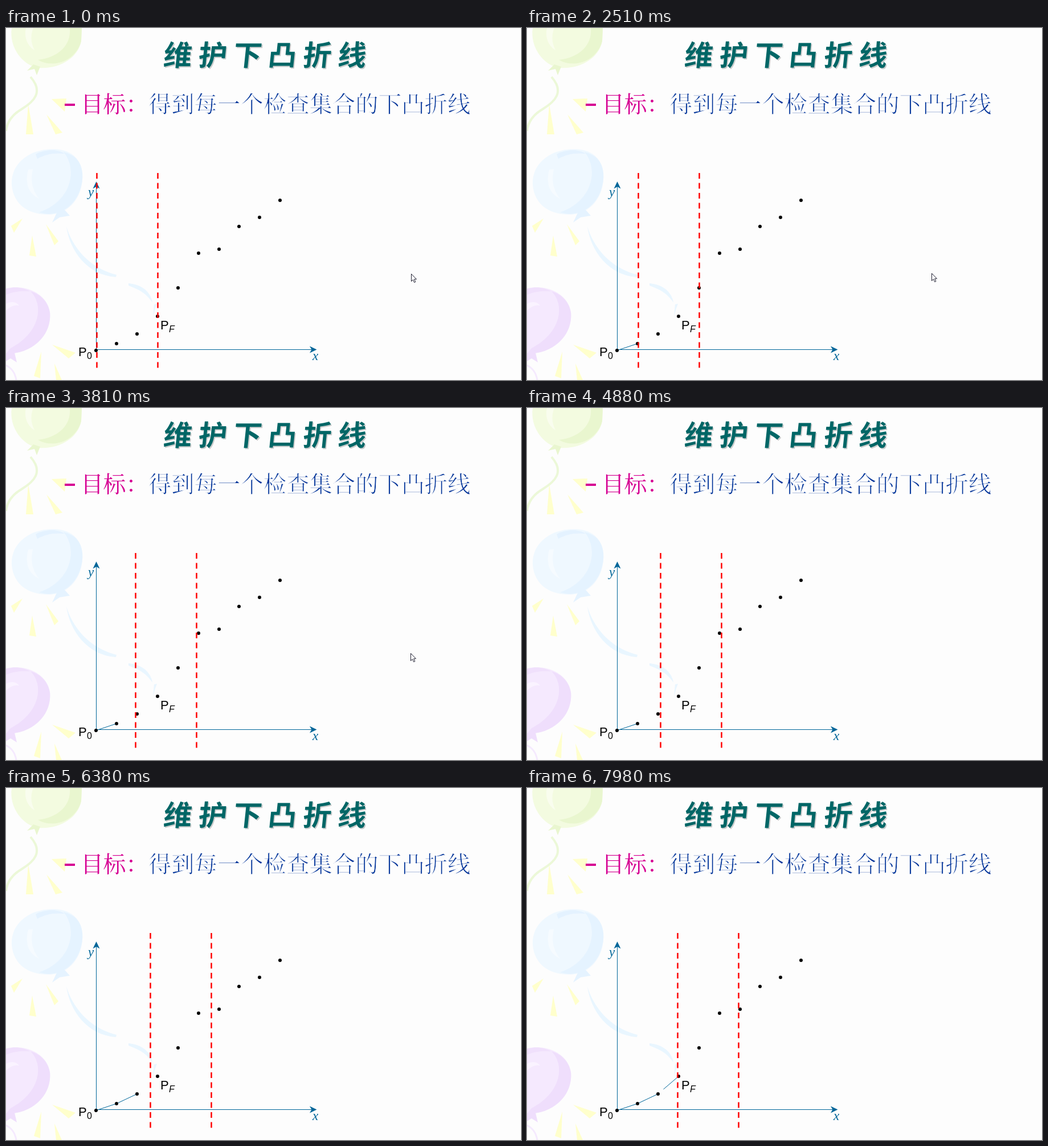
Recreate the animation shown at these times as an HTML page. Size 904x619 px, loop 8 s.

```html
<!DOCTYPE html>
<html lang="zh">
<head>
<meta charset="utf-8">
<style>
html, body { margin: 0; width: 100%; height: 100%; overflow: hidden; background: #fdfdfd; }
svg { display: block; width: 904px; height: 619px; }
.title { font: 900 50px "Noto Sans CJK SC", "Noto Sans CJK", sans-serif; letter-spacing: 11.2px; }
.goal { font: 300 40px "Noto Serif CJK SC", "Noto Sans CJK SC", "Noto Sans CJK", serif; }
.fine { stroke: #fdfdfd; stroke-width: .8; }
.label { font-family: "Liberation Sans", Arial, sans-serif; font-size: 22px; }
.sub { font-size: 16px; }
.axis { font: italic 23px "Liberation Serif", Times, serif; fill: #069; }
.thin { stroke: #069; stroke-width: 1; fill: none; }
.sweep { stroke: #f00; stroke-width: 2.5; stroke-dasharray: 10 7.5; }
</style>
</head>
<body>
<svg viewBox="0 0 904 619">
  <!-- balloons -->
  <g fill="#ffffcc">
    <path d="M39 134L35 187L48 187ZM71 152L87 187L99 184ZM80 125L106 124L103 147Z"/>
    <path d="M29 335L9 348L14 360ZM46 365L41 400L53 402ZM70 345L85 382L92 375Z"/>
    <path d="M62 569L49 612L60 616ZM85 590L88 619L98 619ZM81 557L110 581L122 571Z"/>
  </g>
  <g>
    <path d="M10 0C5 34 29 66 57 70C94 73 127 52 132 23L133 0Z" fill="#f3fbe0"/>
    <path d="M112 0C115 30 92 52 56 56C83 72 123 58 132 23L133 0Z" fill="#e9f6cf"/>
    <path d="M35 0C31 16 38 32 50 39C43 25 43 12 48 0Z" fill="#f9fdee"/>
    <path d="M48 64L37 75L50 72L54 83L60 68Z" fill="#e9f6cf"/>
    <path d="M43 86C66 112 50 129 27 143C10 153 2 165 0 181" fill="none" stroke="#ecf8d8" stroke-width="4"/>
  </g>
  <g>
    <path d="M10 276C8 240 39 213 82 213C114 212 137 232 134 266C132 303 107 327 77 328C39 329 13 310 10 276Z" fill="#eff8ff"/>
    <path d="M101 218C127 249 114 306 58 324C99 337 131 304 134 266C136 239 124 224 101 218Z" fill="#e5f3ff"/>
    <path d="M52 222C68 213 91 213 103 221C84 219 69 222 55 230Z" fill="#e4f2ff"/>
    <path d="M39 249C33 273 39 291 58 300C45 283 43 268 47 248Z" fill="#f6fbff"/>
    <path d="M91 321L81 342L94 333L112 330L103 320Z" fill="#e5f3ff"/>
    <path d="M106 349C116 384 145 422 194 434L193 438C144 435 112 393 106 349ZM215 449C240 451 255 466 257 483C245 465 233 460 215 453ZM260 486L258 507L262 493L265 485Z" fill="#e9f6ff"/>
  </g>
  <g>
    <path d="M0 458C35 450 72 467 77 500C80 534 50 570 0 573Z" fill="#f5e9fe"/>
    <path d="M43 463C66 485 62 535 8 563L0 573C50 573 81 537 77 500C74 482 62 469 43 463Z" fill="#efdefc"/>
    <path d="M0 459C14 454 30 456 42 463C28 462 15 463 0 469Z" fill="#f0e0fc"/>
    <path d="M0 485C8 480 18 481 23 488C15 486 7 490 0 497Z" fill="#faf3ff"/>
    <path d="M0 572L14 567L19 588L8 581L0 586Z" fill="#efdefc"/>
    <path d="M0 593C10 598 16 606 18 619" fill="none" stroke="#f5eafe" stroke-width="3"/>
  </g>
  <rect id="patch" width="28" height="28" fill="#fff" visibility="hidden"/>

  <!-- headings -->
  <g class="title" transform="translate(275 66) skewX(-6)">
    <text x="2" y="2" fill="#ccc">维护下凸折线</text>
    <text fill="#066">维护下凸折线</text>
  </g>
  <g class="goal">
    <rect x="103" y="133" width="18" height="4" fill="#d60093"/>
    <text x="131" y="148" fill="#d60093" font-weight="400" letter-spacing="-.4">目标：</text>
    <text class="fine" x="250" y="148" fill="#039" letter-spacing=".4">得到每一个检查集合的下凸折线</text>
  </g>

  <!-- plot -->
  <path class="thin" d="M158.5 566V274M158 565.5H542"/>
  <path d="M158.5 270L164.5 282.5L158.5 279L152.5 282.5ZM545.5 565.5L533 559.5L536.5 565.5L533 571.5Z" fill="#069"/>
  <text class="axis" x="144" y="296">y</text>
  <text class="axis" x="538" y="584">x</text>
  <g id="plot"></g>
  <text class="label" x="127" y="577">P</text>
  <text class="label sub" x="142" y="582">0</text>
  <text class="label" x="271" y="530">P</text>
  <text class="label sub" x="286" y="535" font-style="italic">F</text>
  <g id="sweep" class="sweep"><path d="M0 255V599M107 255V599"/></g>
  <path id="cursor" d="M.5 .5V13.5L3.5 10.7L5.7 15.5L7.8 14.5L5.7 9.8H9.5Z" fill="#fff" stroke="#223"/>
</svg>
<script>
const $ = id => document.getElementById(id);
const LOOP = 8000;
const WIPE = 340;
const points = [[158, 567], [194, 555], [230, 538], [266, 507], [302, 457],
  [338, 396], [374, 389], [409, 349], [445, 333], [481, 303]];
// time and x of the left sweep line
const path = [[0, 159.5], [50, 159.5], [850, 186.5], [1200, 195.5], [2720, 195.5], [3540, 218.5],
  [3810, 227.5], [4080, 234.5], [5600, 234.5], [6380, 253], [6900, 264.5], [LOOP, 264.5]];
// times of the highlight and of the joining line for points 1 to 3
const joins = [[1580, 2070], [4310, 4880], [7200, 7730]];

function add(tag, attrs) {
  const el = document.createElementNS("http://www.w3.org/2000/svg", tag);
  for (const k in attrs) el.setAttribute(k, attrs[k]);
  return $("plot").appendChild(el);
}
const lines = joins.map(() => add("path", { class: "thin" }));
for (const [cx, cy] of points) add("circle", { cx, cy, r: 3 });

function along(t) {
  const i = path.findIndex(k => k[0] > t);
  const [t0, x0] = path[i - 1], [t1, x1] = path[i];
  return x0 + (x1 - x0) * (t - t0) / (t1 - t0);
}

function draw(now) {
  const t = now % LOOP;
  // whole pixel steps keep the dashes crisp
  $("sweep").setAttribute("transform", `translate(${Math.floor(along(t)) + .5} 0)`);

  let spot = null;
  joins.forEach(([show, start], i) => {
    const [x0, y0] = points[i], [x1, y1] = points[i + 1];
    if (t >= show && t < start) spot = points[i + 1];
    const p = Math.max(0, Math.min(1, (t - start) / WIPE));
    lines[i].setAttribute("d", p ? `M${x1} ${y1}L${x1 + (x0 - x1) * p} ${y1 + (y0 - y1) * p}` : "");
  });
  $("patch").setAttribute("visibility", spot ? "visible" : "hidden");
  if (spot) $("patch").setAttribute("transform", `translate(${spot[0] - 14} ${spot[1] - 13})`);

  $("cursor").setAttribute("visibility", t < 4110 ? "visible" : "hidden");
  $("cursor").setAttribute("transform", t < 1310 ? "translate(711 432)" : "translate(710 431)");
  requestAnimationFrame(tick);
}

let origin;
function tick(now) {
  origin ??= now;
  draw(now - origin);
}
draw(0);
</script>
</body>
</html>
```
